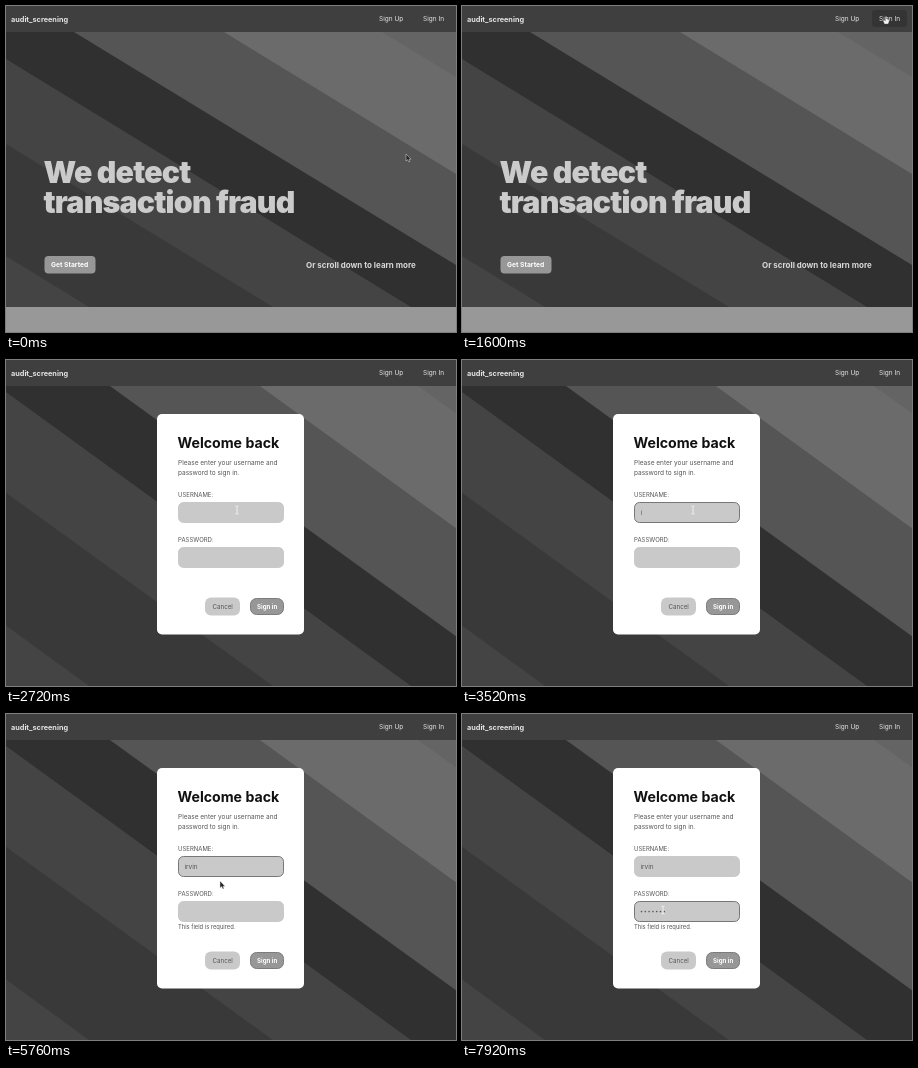
Recreate the animation shown at these times as an HTML page. Size 450x326 px, loop 8000 ms.

```html
<!DOCTYPE html>
<html lang="en">
<head>
<meta charset="utf-8">
<style>
html, body { margin: 0; width: 100%; height: 100%; overflow: hidden; background: #989898; }
svg { display: block; width: 100vw; height: 100vh; font-family: Inter, "Liberation Sans", sans-serif; }
.bold { font-weight: 700; }
.field { fill: #c9c9c9; stroke: #c9c9c9; }
</style>
</head>
<body>
<svg viewBox="0 0 450 326">
  <defs>
    <g id="bands">
      <path fill="#393939" d="M0 0H450V275H0Z"/>
      <path fill="#444" d="M0 112V0H450V275H267Z"/>
      <path fill="#444" d="M0 224L83 275H0Z"/>
      <path fill="#303030" d="M0 27V0H450V275H405Z"/>
      <path fill="#555" d="M68 0H450V233Z"/>
      <path fill="#6b6b6b" d="M218 0H450V142Z"/>
      <path fill="#646464" d="M376 0H450V45Z"/>
    </g>
  </defs>

  <g id="home">
    <use href="#bands" y="26"/>
    <g fill="#cbcbcb" font-size="30.3" font-weight="900" letter-spacing="-.8">
      <text x="37.5" y="177">We detect</text>
      <text x="37.5" y="206.5">transaction fraud</text>
    </g>
    <rect x="38.5" y="250" width="51" height="17.5" rx="4" fill="#979797"/>
    <text class="bold" x="45" y="261.3" font-size="6.7" fill="#fff">Get Started</text>
    <text class="bold" x="300" y="261.5" font-size="8" fill="#d8d8d8">Or scroll down to learn more</text>
  </g>

  <g id="login">
    <use href="#bands" transform="scale(1 1.1855)"/>
    <rect x="151" y="54" width="147" height="220.5" rx="5" fill="#fff"/>
    <text class="bold" x="171.5" y="88" font-size="14.15" fill="#111">Welcome back</text>
    <g fill="#555" font-size="6.5">
      <text x="172" y="104.7">Please enter your username and</text>
      <text x="172" y="114.5">password to sign in.</text>
      <text x="172" y="136.8" font-size="6">USERNAME:</text>
      <text x="172" y="182.4" font-size="6">PASSWORD:</text>
      <rect id="userBox" class="field" x="172.5" y="142.5" width="105" height="20" rx="5"/>
      <rect id="passBox" class="field" x="172.5" y="187.5" width="105" height="20" rx="5"/>
      <text id="user" x="178.5" y="154.8"></text>
      <g id="dots"></g>
      <text id="required" x="172" y="214.8" font-size="5.8">This field is required.</text>
      <rect x="199" y="237.5" width="35" height="18" rx="6" fill="#c9c9c9"/>
      <text x="206.5" y="248.5" font-size="6.2">Cancel</text>
    </g>
    <rect x="244.5" y="238.5" width="33" height="16" rx="6" fill="#979797" stroke="#7c7c7c"/>
    <text class="bold" x="251" y="248.5" font-size="6.1" fill="#fff">Sign in</text>
  </g>

  <path fill="#3f3f3f" d="M0 0H450V26H0Z"/>
  <rect id="hover" x="410" y="4" width="35" height="17" rx="3" fill="#343434"/>
  <g fill="#e6e6e6" font-size="6.5">
    <text class="bold" x="5" y="15.6" font-size="7.3">audit_screening</text>
    <text x="373" y="15.4">Sign Up</text>
    <text x="417" y="15.4">Sign In</text>
  </g>

  <g id="cursor">
    <path id="arrow" d="M0 0V7L1.7 5.6L2.8 8L4 7.4L3 5.2H5Z" fill="#222" stroke="#ddd" stroke-width=".5"/>
    <path id="hand" d="M-.6 -3.5H.7V-1L3 -.4V2L2 4H-1.5L-3 .8L-1.8 0L-.6 1Z" fill="#f2f2f2" stroke="#444" stroke-width=".3"/>
    <path id="beam" d="M-1.5 -4Q0 -4 0 -3Q0 -4 1.5 -4M0 -3V3M-1.5 4Q0 4 0 3Q0 4 1.5 4" fill="none" stroke="#f4f4f4" stroke-width=".9"/>
  </g>
</svg>
<script>
const LOOP = 8000, NAME = "irvin";
const $ = id => document.getElementById(id);
const show = (id, on) => $(id).style.display = on ? "" : "none";
const count = (t, start, step, max) => Math.max(0, Math.min(max, Math.floor((t - start) / step) + 1));

// Pointer stops: time, x, y
const stops = [
  [0, 400, 148], [400, 400, 148], [1280, 424, 14], [1880, 424, 14],
  [2640, 231, 150], [5360, 231, 150], [5700, 214, 167],
  [5920, 214, 167], [6320, 201, 196], [LOOP, 201, 196]
];

function pointer(t) {
  const i = stops.findIndex(s => s[0] > t);
  const [t0, x0, y0] = stops[i - 1], [t1, x1, y1] = stops[i];
  const k = (t - t0) / (t1 - t0), e = k * k * (3 - 2 * k);
  return [x0 + (x1 - x0) * e, y0 + (y1 - y0) * e];
}

function draw(now) {
  const t = now % LOOP, open = t >= 1680;
  const [x, y] = pointer(t);
  const onLink = x > 410 && y < 21;
  const inField = open && x > 172 && x < 278 && (y > 142 && y < 163 || y > 187 && y < 208);

  show("home", !open);
  show("login", open);
  show("hover", onLink);
  show("hand", onLink);
  show("beam", inField);
  show("arrow", !onLink && !inField);
  $("cursor").setAttribute("transform", `translate(${x} ${y})`);

  $("userBox").style.stroke = t >= 3040 && t < 6480 ? "#777" : "";
  $("passBox").style.stroke = t >= 6480 ? "#777" : "";
  $("user").textContent = NAME.slice(0, count(t, 3520, 160, NAME.length));
  show("required", t >= 4720);
  const n = count(t, 6800, 150, 7);
  $("dots").innerHTML = Array.from({ length: n }, (_, i) =>
    `<circle cx="${179.5 + i * 3.8}" cy="197.6" r=".8"/>`).join("");
}

const begin = performance.now();
function tick() {
  draw(performance.now() - begin);
  requestAnimationFrame(tick);
}
tick();
</script>
</body>
</html>
```
